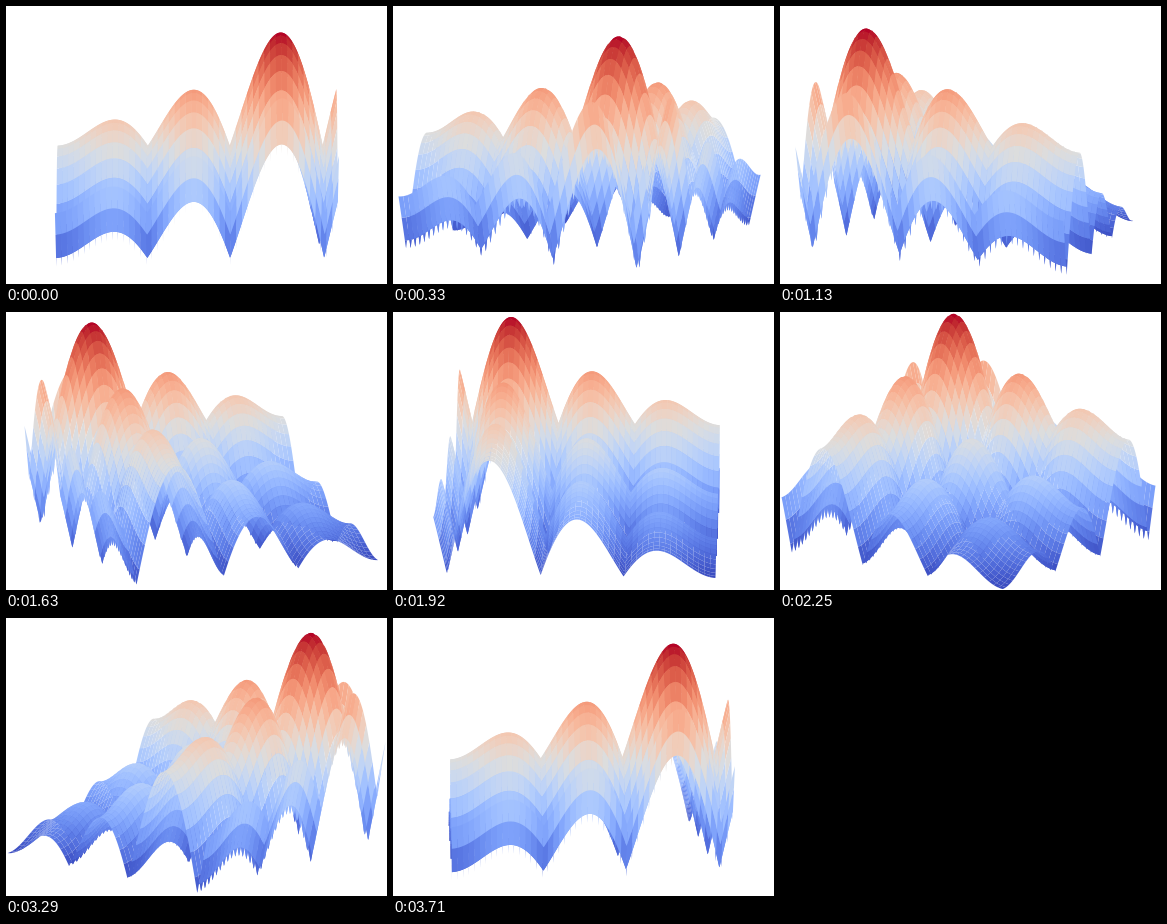
A matplotlib script that plays this animation: 381 by 278 pixels, repeating every 3.75 s.

```python
import numpy as np
import matplotlib.pyplot as plt
from matplotlib.animation import FuncAnimation
from matplotlib.collections import PolyCollection

W, H, DPI = 381, 278, 100
FRAMES, LOOP_MS = 90, 3750
CENTER = 190.8, 125.2       # where the middle of the box lands on the stage
XY_SCALE, Z_SCALE = 26.9, 12.65
DISTANCE = 2358             # camera distance, in pixels
ELEV = np.radians(10)


def alpine(x, y):
    return np.abs(x * np.sin(x) + 0.1 * x) + np.abs(y * np.sin(y) + 0.1 * y)


def cell_outlines(edges, samples=10):
    """Perimeters of all grid cells, shape (cells, points), as x and y."""
    s = np.arange(samples) / samples
    zero, one = np.zeros(samples), np.ones(samples)
    px = np.concatenate([s, one, 1 - s, zero])
    py = np.concatenate([zero, s, one, 1 - s])
    start, width = edges[:-1], np.diff(edges)
    i, j = (k.ravel()[:, None] for k in np.indices((len(start), len(start))))
    return start[i] + width[i] * px, start[j] + width[j] * py


X, Y = cell_outlines(np.append(np.arange(50) * 0.2, 9.99))
Z = alpine(X, Y)

height = Z.mean(axis=1)
colors = plt.get_cmap("coolwarm")((height - height.min()) / np.ptp(height))

PX, PY = (X - 5) * XY_SCALE, (Y - 5) * XY_SCALE
PZ = (Z - Z.max() / 2) * Z_SCALE


def project(azim):
    """Perspective view: stage coordinates and depth of every outline point."""
    ca, sa = np.cos(azim), np.sin(azim)
    ce, se = np.cos(ELEV), np.sin(ELEV)
    toward = PX * ca + PY * sa
    right = PY * ca - PX * sa
    up = PZ * ce - toward * se
    depth = DISTANCE - toward * ce - PZ * se
    zoom = DISTANCE / depth
    points = np.stack([CENTER[0] + right * zoom, CENTER[1] - up * zoom], axis=-1)
    return points, depth


fig = plt.figure(figsize=(W / DPI, H / DPI), dpi=DPI, facecolor="white")
ax = fig.add_axes([0, 0, 1, 1])
ax.set(xlim=(0, W), ylim=(H, 0))
ax.axis("off")

# Antialiasing keeps the faint seams between cells.
surface = PolyCollection([], linewidths=0, edgecolors="none", antialiaseds=True)
ax.add_collection(surface, autolim=False)


def update(frame):
    points, depth = project(2 * np.pi * frame / FRAMES)
    order = np.argsort(-depth.mean(axis=1))     # far cells first
    surface.set_verts(points[order])
    surface.set_facecolor(colors[order])
    return (surface,)


anim = FuncAnimation(fig, update, frames=FRAMES, interval=LOOP_MS / FRAMES,
                     repeat=True, repeat_delay=0)
plt.show()
```
